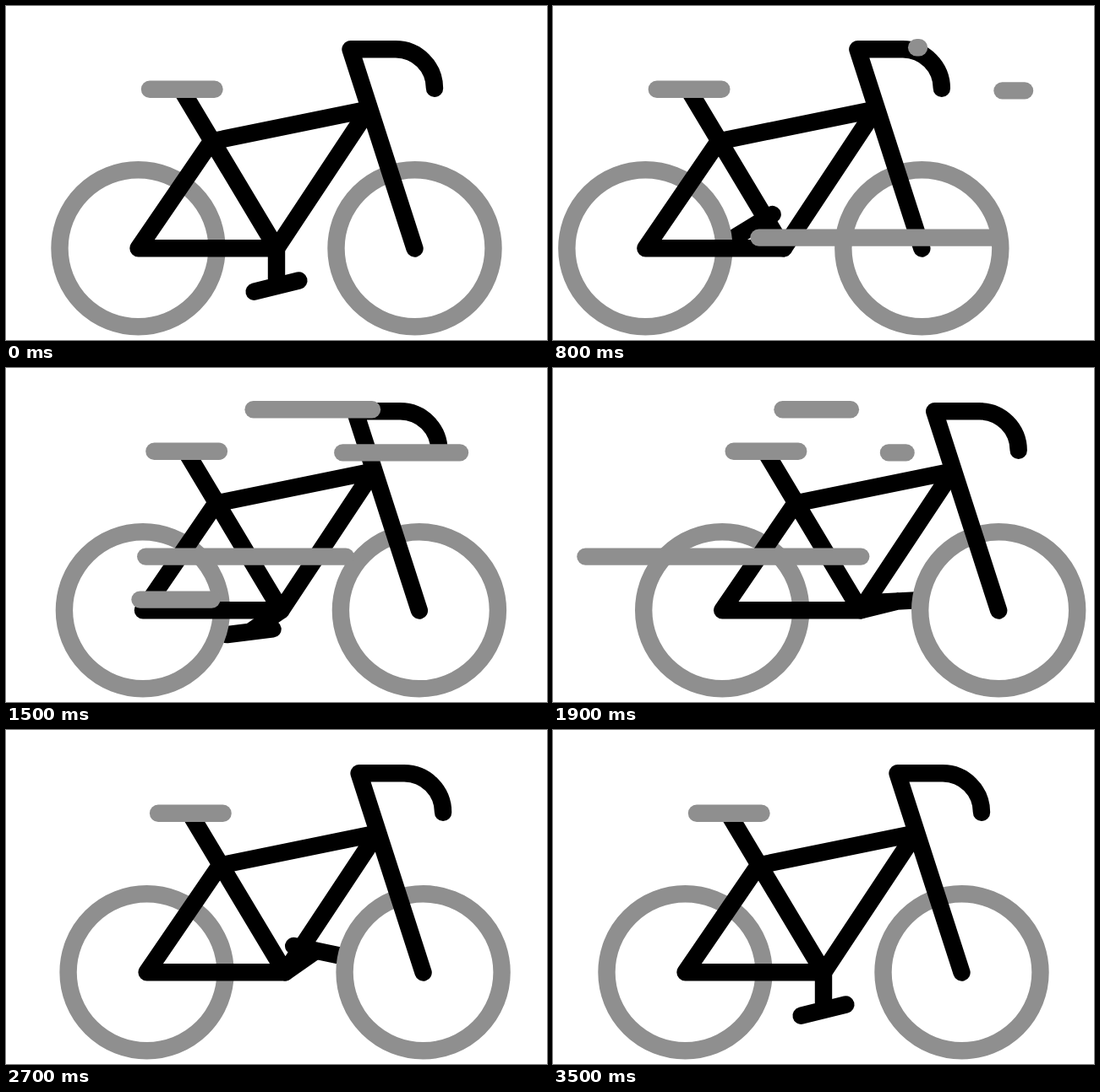
Animation, 640 px wide and 396 px high, one loop 3600 ms. Source, as an HTML page:

```html
<!DOCTYPE html>
<html lang="en">
<head>
<meta charset="utf-8">
<title>Bicycle</title>
<style>
  html, body { margin: 0; width: 100%; height: 100%; overflow: hidden; background: #fff; }
  svg { display: block; width: 640px; height: 396px; }
  g, path { fill: none; stroke-width: 20.4; stroke-linecap: round; stroke-linejoin: round; }
  .dark { stroke: #000; }
  .grey { stroke: #8f8f8f; }
</style>
</head>
<body>
<svg viewBox="0 0 640 396">
  <g id="bike">
    <path id="crank" class="dark"/>
    <g class="grey">
      <circle cx="156.5" cy="287.3" r="93"/>
      <circle cx="483.5" cy="287.3" r="93"/>
    </g>
    <g class="dark">
      <path d="M208 100L320 287.3H156.5L243 160.5L429 122.5L320 287.3"/>
      <path d="M483.5 287.5L407.5 51.3H461A46 46.5 0 0 1 507 97.8"/>
    </g>
    <path class="grey" d="M170 98.8H246.5"/>
  </g>
  <g id="wind" class="grey"></g>
</svg>
<script>
const LOOP = 3600, HUB = [320, 287.3], ARM = 44.8, PEDAL = 27.2;
const $ = id => document.getElementById(id);

// Symmetric cubic Bezier easing with handles (a, 0) and (1 - a, 1)
function ease(u, a = 0.42) {
  if (u <= 0) return 0;
  if (u >= 1) return 1;
  let lo = 0, hi = 1, s;
  for (let i = 0; i < 24; i++) {
    s = (lo + hi) / 2;
    const x = 3 * (1 - s) * s * ((1 - s) * a + s * (1 - a)) + s ** 3;
    if (x < u) lo = s; else hi = s;
  }
  return s * s * (3 - 2 * s);
}

// Eased value from [time, value] keys
function track(keys, t) {
  let value = keys[0][1];
  for (let i = 1; i < keys.length; i++) {
    const [t0, v0] = keys[i - 1], [t1, v1] = keys[i];
    value += (v1 - v0) * ease((t - t0) / (t1 - t0));
  }
  return value;
}

const shift = [[0, 0], [1000, -51.3], [1900, 43.7], [3100, 0]];
const tilt = [[0, -14], [500, -59], [1100, -4], [1500, -7], [1900, -3], [2700, 12], [3500, -14]];

// Each streak grows leftwards, then its right end catches up
const streaks = [
  { y: 274.6, right: 527, length: 368.5, head: [0, 1200], tail: [900, 900] },
  { y: 223.6, right: 402, length: 368.5, head: [800, 1200], tail: [1700, 900] },
  { y: 100.4, right: 558, length: 161, head: [500, 1070], tail: [1300, 800] },
  { y: 49.2, right: 433, length: 161.5, head: [700, 1070], tail: [1500, 800] }
];
for (const s of streaks) {
  s.path = document.createElementNS("http://www.w3.org/2000/svg", "path");
  $("wind").append(s.path);
}

function drawCrank(t) {
  const turn = Math.PI / 2 + 6 * Math.PI * ease(t / 3500, 0.39);
  const lean = track(tilt, t) * Math.PI / 180;
  const x = HUB[0] + ARM * Math.cos(turn), y = HUB[1] + ARM * Math.sin(turn);
  const dx = PEDAL * Math.cos(lean), dy = PEDAL * Math.sin(lean);
  $("crank").setAttribute("d", `M${HUB}L${x} ${y}M${x - dx} ${y - dy}L${x + dx} ${y + dy}`);
}

function drawStreak({ y, right, length, head, tail, path }, t) {
  const end = ([start, span]) => right - length * ease((t - start) / span);
  const x0 = end(head), x1 = end(tail);
  path.setAttribute("d", x1 - x0 > 0.01 ? `M${x0} ${y}H${x1}` : "");
}

function draw() {
  const t = performance.now() % LOOP;
  $("bike").setAttribute("transform", `translate(${track(shift, t)})`);
  drawCrank(t);
  for (const s of streaks) drawStreak(s, t);
  requestAnimationFrame(draw);
}
draw();
</script>
</body>
</html>
```
